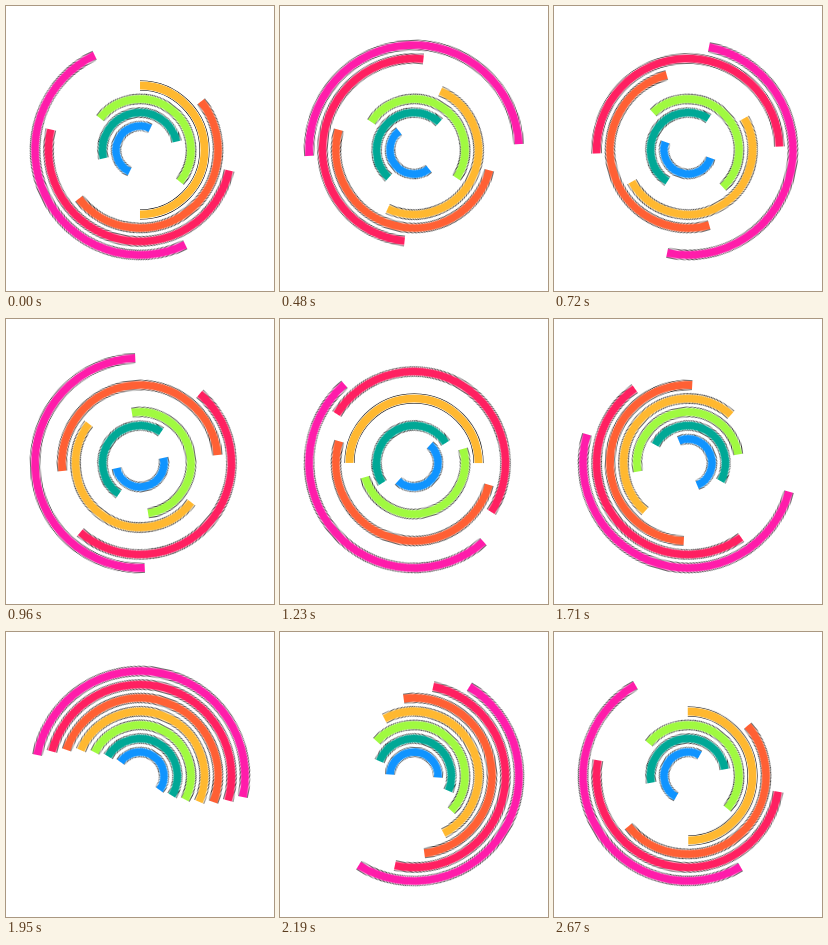
Write an HTML page that moves like this. It is 268 px wide and 285 px high and loops after 2.7 s.

```html
<!DOCTYPE html>
<html lang="en">
<head>
<meta charset="utf-8">
<title>Turning arcs</title>
<style>
  html, body { margin: 0; width: 100%; height: 100%; overflow: hidden; background: #fff; }
  svg { display: block; width: 268px; height: 285px; }
  path { fill: none; }
  .edge { stroke: #000; stroke-width: 10.1; }
  .gap { stroke: #fff; stroke-width: 9; }
  .band { stroke-width: 7.8; }

  /* The innermost arc turns back steadily; every further arc turns relative to the one inside it. */
  .core { animation: back 2.7s linear infinite; }
  .ring { animation: fan 2.7s cubic-bezier(.665, .231, .335, .769) infinite; }
  @keyframes back {
    from { transform: rotate(-154.286deg); }
    to { transform: rotate(-514.286deg); }
  }
  @keyframes fan {
    from { transform: rotate(51.429deg); }
    to { transform: rotate(411.429deg); }
  }
</style>
</head>
<body>
<svg viewBox="0 0 268 285"><g id="stage" transform="translate(134 144)"></g></svg>
<script>
  const colors = ['#1094ff', '#00a896', '#a0fa40', '#ffb830', '#ff6034', '#ff2061', '#ff1caa'];

  function add(parent, tag, attrs) {
    const el = document.createElementNS('http://www.w3.org/2000/svg', tag);
    for (const key in attrs) el.setAttribute(key, attrs[key]);
    return parent.appendChild(el);
  }

  let parent = document.getElementById('stage');
  colors.forEach((color, i) => {
    const r = 24 + 13.5 * i;
    const d = `M0 ${-r}A${r} ${r} 0 0 1 0 ${r}`;
    parent = add(parent, 'g', { class: i ? 'ring' : 'core' });
    add(parent, 'path', { class: 'edge', d });
    add(parent, 'path', { class: 'gap', d });
    add(parent, 'path', { class: 'band', d, stroke: color });
  });
</script>
</body>
</html>
```
